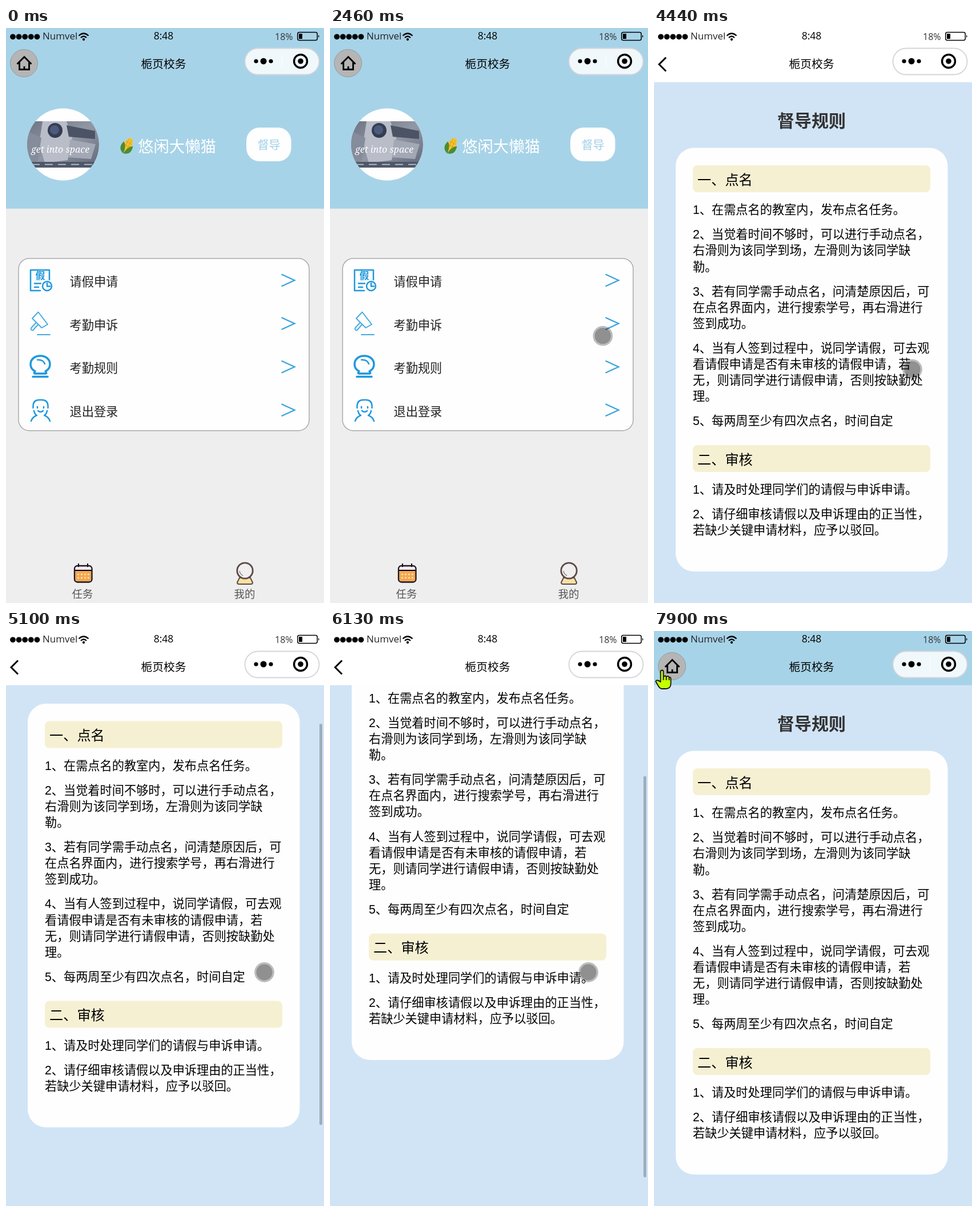
Recreate the animation shown at these times as an HTML page. Size 557x1005 px, loop 7990 ms.

```html
<!DOCTYPE html>
<html lang="zh-CN">
<head>
<meta charset="utf-8">
<style>
html, body { margin: 0; width: 100%; height: 100%; overflow: hidden; background: #eee; }
svg { display: block; width: 557px; height: 1005px; }
text { font-family: "Liberation Sans", "Noto Sans CJK SC", "Noto Sans CJK", sans-serif; font-weight: 300; }
.ui { font-family: "Open Sans", sans-serif; font-weight: 400; }
.mid { text-anchor: middle; }
.line { fill: none; stroke: #1f98dc; stroke-width: 2.5; stroke-linecap: round; stroke-linejoin: round; }
.ink { fill: none; stroke: #000; stroke-width: 3; }
</style>
</head>
<body>
<svg viewBox="0 0 557 1005">
  <defs>
    <clipPath id="round"><circle cx="100" cy="203.5" r="63"/></clipPath>
    <linearGradient id="photo" x2="1" y2="1">
      <stop stop-color="#6d7584"/><stop offset=".5" stop-color="#9297a5"/><stop offset="1" stop-color="#5f6778"/>
    </linearGradient>
  </defs>

  <g id="home">
    <rect width="557" height="1005" fill="#eee"/>
    <rect width="557" height="315.700" fill="#a7d3e8"/>
    <g clip-path="url(#round)">
      <rect x="37" y="140" width="126" height="127" fill="#fefefe"/>
      <rect x="37" y="163" width="126" height="81" fill="url(#photo)"/>
      <path d="M64 163h42l10 30-8 38-40 5-10-34z" fill="#b9bdc8"/>
      <path d="M106 170l50 10v14l-46-4z" fill="#4b5364"/>
      <path d="M37 180l25 12-6 40-19 8z" fill="#858c9b"/>
      <path d="M112 195l45 8-8 26-40-3z" fill="#a3a8b5"/>
      <circle cx="86" cy="179" r="13" fill="#353d52"/>
      <circle cx="85" cy="178" r="8" fill="#4c5b7d"/>
      <path d="M37 234h126v10H37z" fill="#4f5868"/>
      <path d="M45 238.500h110" stroke="#ccd0d8" stroke-width="1.500" stroke-dasharray="14 9"/>
      <text x="95" y="218" class="mid" fill="#fff" font-size="16" font-style="italic" style="font-family:'Noto Serif',serif">get into space</text>
    </g>
    <g transform="rotate(28 212 207)">
      <ellipse cx="212" cy="203" rx="7" ry="12" fill="#f7c22f"/>
      <path d="M209 193v20M214 193v20M206 200h12M206 206h12" stroke="#e0a21c" fill="none"/>
      <path d="M212 221q-14-4-9-19 8 4 9 19 1-15 9-19 5 15-9 19z" fill="#4d8d2f"/>
    </g>
    <text x="231" y="216.500" font-size="27.400" fill="#fff">悠闲大懒猫</text>
    <rect x="421" y="174" width="78.500" height="59" rx="23" fill="#fefefe"/>
    <text x="460.500" y="211.500" class="mid" font-size="20" fill="#a0d0e8">督导</text>

    <rect x="22" y="402.700" width="509" height="301" rx="18.600" fill="#fefefe" stroke="#aaa" stroke-width="1.500"/>
    <g id="rows"></g>
    <g class="line">
      <path d="M60 459H43V423h33v17M50 446.500h11M50 453h7M72 446v5.500h5"/>
      <circle cx="72" cy="451" r="8"/>
    </g>
    <text x="60" y="439" class="mid" font-size="17" fill="#1f98dc" style="font-weight:700">假</text>
    <path class="line" style="stroke:#45aae2;stroke-width:1.900" d="M56.500 496.500L46 507.500l16.500 16.500 10.500-6zM53 514.500l-9 10q-1 4 3 4l9-10M55 536h22"/>
    <g class="line" style="stroke-width:3.500">
      <path d="M51 600q-8-4-8-12c0-20 34-20 34 0q0 8-8 12 4 4-1 4H52q-5 0-1-4zM47 609.500h26"/>
      <path d="M55 580q10-1 13 7" style="stroke-width:2.500"/>
    </g>
    <path class="line" d="M47.500 664v-3q0-11 11-11h4q11 0 11 11v3M49 669q1 6 5 8-8 3-10 10M72 669q-1 6-5 8 8 3 10 10M55 662v2M66 662v2M56 669q4.500 4 9 0"/>

    <rect x="120" y="940" width="30.500" height="28" rx="4" fill="#f4e9ee"/>
    <path d="M120 949h30v15q0 4-4 4h-22q-4 0-4-4z" fill="#f3a850"/>
    <path d="M125 955h21M125 961h21" stroke="#ffe0ae" stroke-width="2.500" stroke-dasharray="3 3"/>
    <path d="M120 948h30M127 936v6M143 936v6" class="ink" style="stroke-width:2"/>
    <rect x="120" y="940" width="30.500" height="28.500" rx="5" class="ink" style="stroke:#1c1724;stroke-width:2.300"/>
    <path d="M409 961h19l4 8q0 3-3 3h-21q-3 0-3-3z" fill="#fae0a5" stroke="#5c4a45" stroke-width="2"/>
    <circle cx="418.500" cy="948.500" r="13.700" fill="#f1eef0" stroke="#5c4a45" stroke-width="2.800"/>
    <path d="M409 949q1 6 6 8" fill="none" stroke="#8b7b78" stroke-width="1.500"/>
    <g class="mid" font-size="18.400" fill="#555">
      <text x="134" y="995.500">任务</text><text x="418" y="995.500">我的</text>
    </g>
    <rect id="tap" x="455" y="573.500" width="76" height="38" rx="2" fill="#33b5e5" fill-opacity=".4"/>
  </g>

  <g id="rules">
    <rect width="557" height="1005" fill="#d1e4f6"/>
    <g id="scroll">
      <text x="276" y="172.500" class="mid" font-size="30" fill="#333" style="font-weight:700">督导规则</text>
      <rect x="38" y="209.500" width="476.500" height="740.500" rx="32" fill="#fefefe"/>
    </g>
    <rect id="bar" x="549" width="5" height="701" rx="2" fill-opacity=".24"/>
  </g>

  <rect id="header" width="557" height="94.700"/>
  <g id="dots"></g>
  <text x="64" y="20" class="ui" font-size="17" fill="#222">Numvel</text>
  <g class="ink" style="stroke-width:2.300">
    <path d="M127.500 13.500q8.500-8 17 0M131 17q5-5 10 0"/><circle cx="136" cy="20" r="1"/>
  </g>
  <text x="276" y="20" class="ui mid" font-size="17.500">8:48</text>
  <text x="471" y="21" class="ui" font-size="16" fill="#333">18%</text>
  <rect x="510.700" y="7.500" width="34.500" height="14" rx="3" class="ink" style="stroke-width:1.500"/>
  <path d="M513 10h6v9h-6zM547 12q3 2.500 0 5z"/>
  <text x="276" y="70" class="mid" font-size="19.800">栀页校务</text>
  <rect x="418.500" y="35.500" width="130" height="46" rx="23" fill="#fff" fill-opacity=".84" stroke="#d3d5d8" stroke-width="1.800"/>
  <path d="M483.500 46v24" stroke="#fff" stroke-opacity=".7"/>
  <circle cx="438" cy="58" r="3.600"/><circle cx="451" cy="58" r="5.500"/><circle cx="464" cy="58" r="3.600"/>
  <circle cx="516" cy="58" r="11.500" class="ink" style="stroke-width:3.400"/><circle cx="516" cy="58" r="4.800"/>
  <g id="homeButton">
    <circle cx="31.500" cy="61.500" r="24" fill="#b5b5b5" stroke="#929a9e"/>
    <path class="ink" style="stroke-width:2.800" d="M19.500 63L32 50.500 44.500 63M23.500 60v12.500h17V60M32 67v5"/>
  </g>
  <path id="back" class="ink" d="M21 51.500L9 63.500l12 12"/>

  <g id="touch">
    <circle r="14.200" fill-opacity=".43"/>
    <circle r="15.800" fill="none" stroke="#000" stroke-opacity=".26" stroke-width="3.200"/>
  </g>
  <path id="hand" fill="#c4ff00" stroke="#111" stroke-width="1.800" stroke-linejoin="round"
    d="M-2.500 18V3q0-2.500 2.500-2.500T2.500 3v9q4-3 5 0 4-2 5 1 3-1 3 3v8q0 9-9 9H0q-4 0-7-6l-4-7q2-4 8.500 1zM2.500 12v6M7.500 12v6M12.500 13v5"/>
</svg>

<script>
const $ = id => document.getElementById(id);
const DURATION = 7990, TICK = 93.55, TICK_START = 780;

$('rows').innerHTML = ['请假申请', '考勤申诉', '考勤规则', '退出登录'].map((label, i) => {
  const y = 441 + i * 75.6;
  return `<text x="111.500" y="${y + 10}" font-size="21.200" fill="#222">${label}</text>
    <path d="M482.500 ${y - 10.5}l23 10.500-23 10.500" fill="none" stroke="#36a3dd" stroke-width="2.200"/>`;
}).join('');

$('dots').innerHTML = [0, 1, 2, 3, 4].map(i => `<circle cx="${12 + i * 10.6}" cy="15.300" r="4.900"/>`).join('');

// Each section: heading, top of its bar, then paragraphs with "|" at line breaks.
const sections = [
  ['一、点名', 240, [
    '1、在需点名的教室内，发布点名任务。',
    '2、当觉着时间不够时，可以进行手动点名，|右滑则为该同学到场，左滑则为该同学缺|勒。',
    '3、若有同学需手动点名，问清楚原因后，可|在点名界面内，进行搜索学号，再右滑进行|签到成功。',
    '4、当有人签到过程中，说同学请假，可去观|看请假申请是否有未审核的请假申请，若|无，则请同学进行请假申请，否则按缺勤处|理。',
    '5、每两周至少有四次点名，时间自定']],
  ['二、审核', 729, [
    '1、请及时处理同学们的请假与申诉申请。',
    '2、请仔细审核请假以及申诉理由的正当性，|若缺少关键申请材料，应予以驳回。']]
];
for (const [heading, top, paragraphs] of sections) {
  let y = top + 85.2;
  let html = `<rect x="68" y="${top}" width="416" height="47" rx="8" fill="#f6f0d2"/>
    <text x="76" y="${top + 33.5}" font-size="24.200">${heading}</text>`;
  for (const paragraph of paragraphs) {
    for (const line of paragraph.split('|')) {
      html += `<text x="68" y="${y}" font-size="21.200">${line}</text>`;
      y += 28.1;
    }
    y += 15;
  }
  $('scroll').innerHTML += html;
}

// Keys are [time, ...values].
const pointerKeys = [
  [790, 408.5, 918], [1341, 427.5, 507], [1528, 441.5, 462], [1715, 457.5, 444.5],
  [1996, 457, 445], [2651, 493.5, 608], [2838, 492, 597], [4054, 492, 597],
  [4428, 452.5, 596.5], [6580, 452.5, 596.5], [7422, 46, 70], [7609, 14, 68]
];
const scrollKeys = [[4896, 0], [5364, 206], [5457, 247], [6019, 247], [6112, 200.5], [6486, 0]];

function sample(keys, time) {
  const next = keys.findIndex(key => key[0] > time);
  if (next === 0) return keys[0].slice(1);
  if (next < 0) return keys[keys.length - 1].slice(1);
  const a = keys[next - 1], b = keys[next];
  const p = (time - a[0]) / (b[0] - a[0]);
  return a.slice(1).map((v, i) => v + (b[i + 1] - v) * p);
}

const show = (id, on) => $(id).setAttribute('visibility', on ? 'visible' : 'hidden');
const move = (id, x, y) => $(id).setAttribute('transform', `translate(${x} ${y})`);
const within = (t, from, to) => t >= from && t < to;

function draw(t) {
  const tick = TICK_START + Math.floor((t - TICK_START) / TICK) * TICK;
  const [x, y] = sample(pointerKeys, tick);
  const [offset] = sample(scrollKeys, tick);
  const slide = Math.min(1, Math.max(0, (tick - 3400) / 460));
  const blue = !within(t, 3300, 7800);
  const overHeader = y < 95;

  $('header').setAttribute('fill', blue ? '#a7d3e8' : '#fff');
  show('homeButton', blue);
  show('back', !blue);
  show('tap', within(t, 3210, 3600));
  move('rules', 557 * (1 - slide) ** 2, 0);
  move('scroll', 0, -offset);
  $('bar').setAttribute('y', 98 + offset * 0.778);
  show('bar', within(t, 4990, 5930) || within(t, 6120, 6690));
  show('touch', t >= 785 && !overHeader);
  show('hand', t >= 785 && overHeader);
  move('touch', x, y);
  move('hand', x, y);
}

function frame() {
  draw(performance.now() % DURATION);
  requestAnimationFrame(frame);
}
frame();
</script>
</body>
</html>
```
